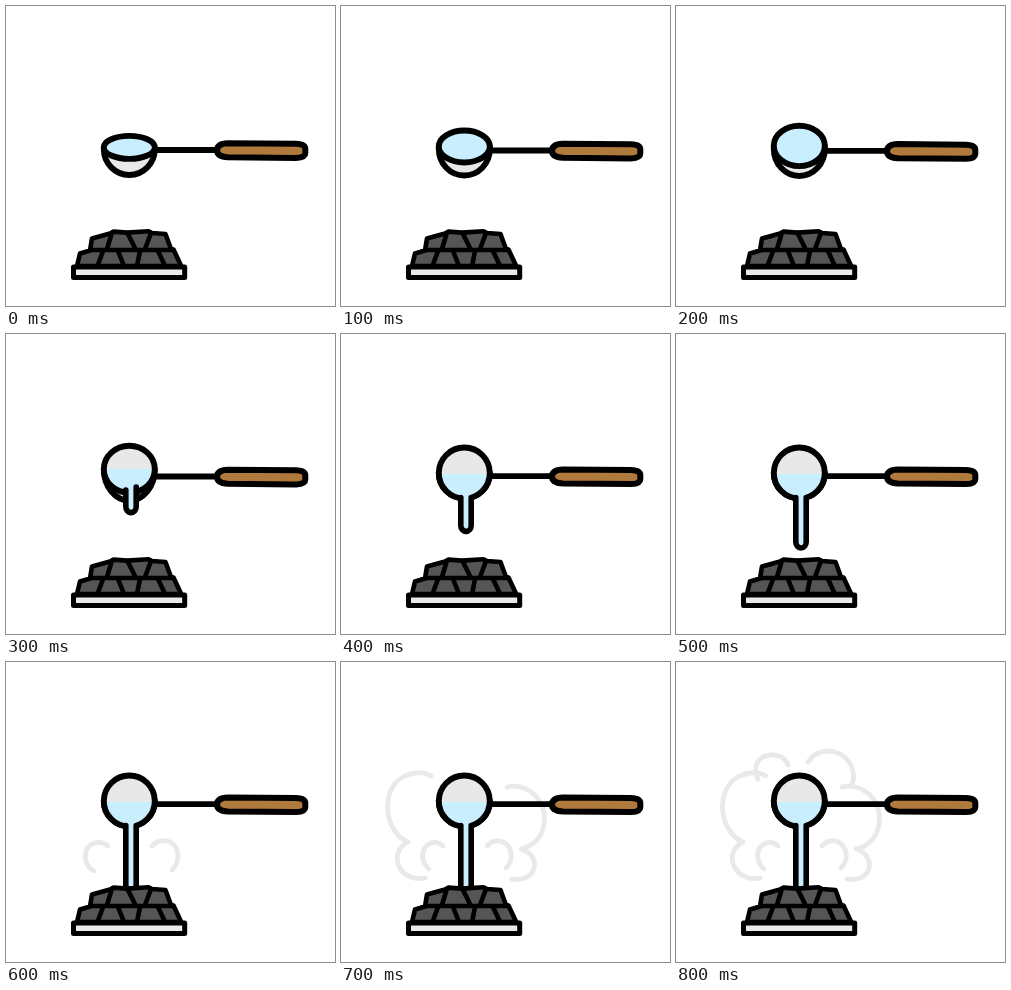
Animation of 329x300 px, one loop 1000 ms. Source, as an HTML page:

```html
<!DOCTYPE html>
<html lang="en">
<head>
<meta charset="utf-8">
<title>Water poured over hot stones</title>
<style>
html, body { margin: 0; width: 100%; height: 100%; overflow: hidden; background: #fff; }
svg { display: block; width: 329px; height: 300px; }
.ink { stroke: #000; stroke-linecap: round; stroke-linejoin: round; }
.steam { fill: none; stroke: #e9e9e9; stroke-width: 4.8; stroke-linecap: round; stroke-linejoin: round; }
</style>
</head>
<body>
<svg viewBox="0 0 329 300">
  <defs><clipPath id="cup"><ellipse id="cupShape" cx="123.3" rx="25.5"/></clipPath></defs>
  <g class="steam">
    <path id="curls"/>
    <path id="sides" d="M90 114C82 109 71 110 62 115C49 122 45 138 47 151C49 165 57 176 67 180C57 185 54 195 58 204C62 214 74 218 84 216M166 125C179 122 191 128 198 138C207 152 204 170 195 179C190 184 185 186 180 187C190 190 195 198 193 206C191 215 181 219 171 217"/>
    <path id="tops" d="M82 117C77 109 80 99 87 95C97 90 109 94 112 103M132 100C138 91 148 87 159 90C173 94 181 109 176 123"/>
  </g>
  <g id="handle" class="ink">
    <path d="M149 0H211" fill="none" stroke-width="5.8"/>
    <path d="M211 .3C211-4.5 215-6.6 222-6.8L290-6.2C296-6 299.300-4.200 299.300-1V3C299.300 6 296 7.600 290 7.900L222 7.300C215 7 211 5 211 .3Z" fill="#b07a3c" stroke-width="6"/>
  </g>
  <path id="bowl" class="ink" fill="#e8e8e8" stroke-width="5.9"/>
  <g clip-path="url(#cup)">
    <rect x="90" y="100" width="66" height="80" fill="#e8e8e8"/>
    <rect id="water" x="90" width="66" height="80" fill="#c9efff"/>
  </g>
  <ellipse id="rim" class="ink" cx="123.3" rx="25.5" fill="none" stroke-width="5.9"/>
  <g id="stream">
    <path id="flow" fill="#c9efff"/>
    <path id="edge" class="ink" fill="none" stroke-width="5.6"/>
  </g>
  <g class="ink" stroke-width="4.600">
    <path d="M71 260L74 247.500L84 244.500L86 232.500L104 227.500L107.500 225.600L121 226.600L142.500 225.200L146 227L159.500 228L165 243L167.500 243.500L175.200 260Z" fill="#555"/>
    <path d="M84 244H167M105.500 228L101 243M121.500 227L129.500 243M145 227L139 243M97 245L91.500 260M112 245L118 260M134 245L131 260M152 245L159 260" fill="none"/>
    <path d="M67.500 261H178.700V271.500H67.500Z" fill="#e8ebe8" stroke-width="5"/>
  </g>
</svg>
<script>
const $ = id => document.getElementById(id);
const LOOP = 1000, STEP = 100;
const L = 119.8, R = 130.2;

// rim centre and radius, bowl bottom, handle height, water level
const poses = [
  [141.4, 11.5, 169, 144, 100],
  [140.5, 16, 169.5, 144.5, 100],
  [139.9, 20.2, 170, 144.9, 100],
  [135.2, 23.5, 166.6, 142.5, 135],
  [139, 25.5, 164.5, 142.2, 139.8]
];
const tips = { 3: 178.6, 4: 197.4, 5: 214 };

function set(id, attrs) {
  for (const k in attrs) $(id).setAttribute(k, attrs[k]);
}
function show(id, on) {
  $(id).style.display = on ? "" : "none";
}

function draw(time) {
  const n = Math.floor((time % LOOP) / STEP);
  const [cy, ry, bottom, hand, level] = poses[Math.min(n, 4)];
  const side = n < 3 ? 143 : cy;

  set("handle", { transform: `translate(0 ${hand})` });
  set("bowl", { d: `M97.800 ${cy}V${side}A25.500 ${bottom - side} 0 0 0 148.800 ${side}V${cy}Z` });
  set("cupShape", { cy, ry });
  set("rim", { cy, ry });
  set("water", { y: level });

  show("stream", n > 2);
  if (n > 2) {
    const [left, right] = n === 3 ? [156, 153] : [163.5, 163.5];
    const end = (tips[n] || 236) - 6;
    const tube = (a, b) => `M${L} ${a}V${end}A5.200 6 0 0 0 ${R} ${end}V${b}`;
    set("flow", { d: tube(left - 4, right - 4) });
    set("edge", { d: tube(left, right) });
  }

  show("curls", n > 5);
  show("sides", n > 6);
  show("tops", n > 7);
  set("curls", {
    d: n < 7
      ? "M102 184C95 178 85 180 81 187C77 195 80 205 88 209M146 184C152 177 163 177 169 184C174 192 172 202 166 208"
      : "M102 184C96 178 87 180 83 187C80 194 82 202 88 207M146 184C152 177 161 177 167 184C172 191 171 200 165 206"
  });
}

function tick() {
  draw(performance.now());
  requestAnimationFrame(tick);
}
tick();
</script>
</body>
</html>
```
